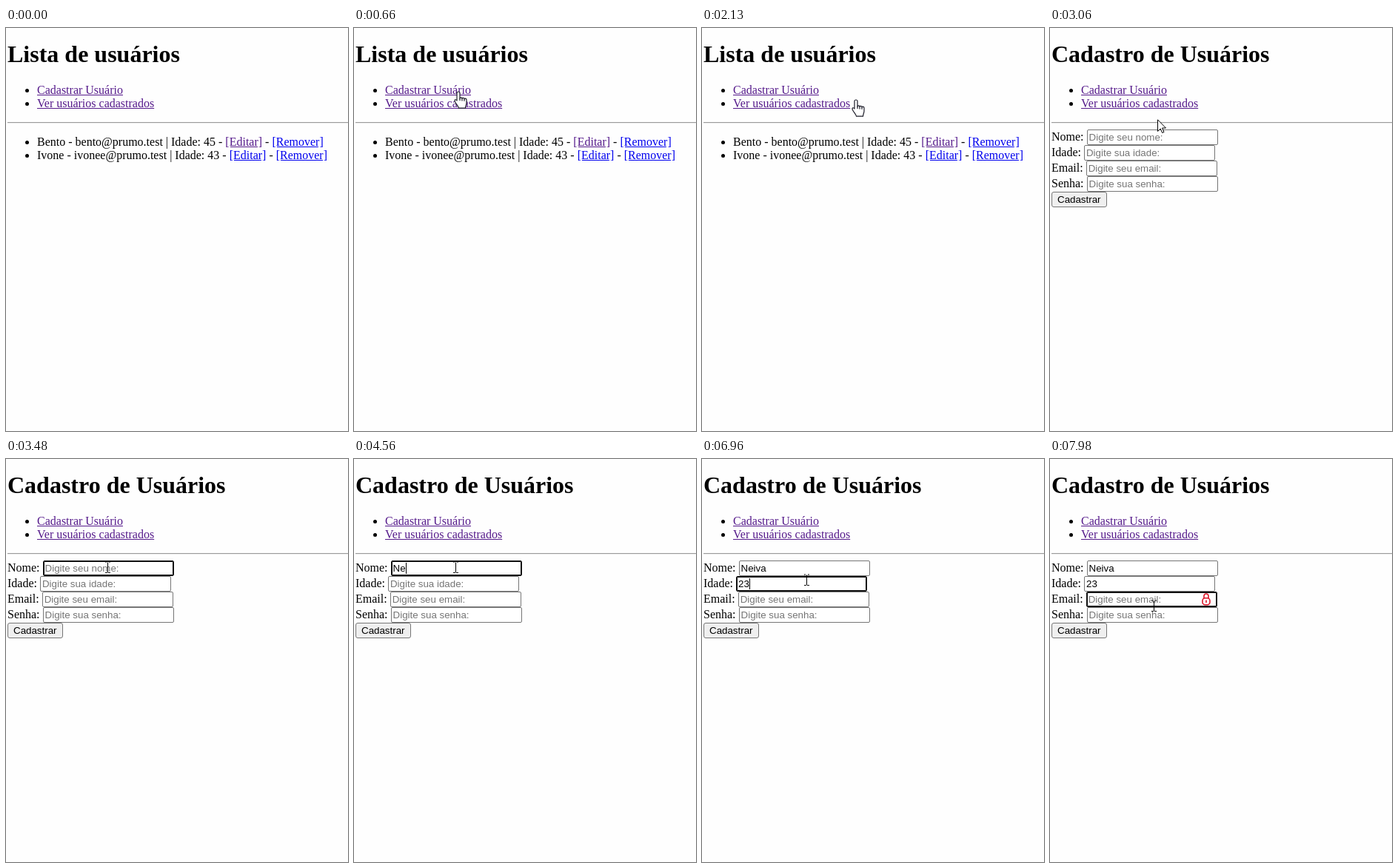
Recreate the animation shown at these times as an HTML page. Size 462 by 544 pixels, loop 8 s.

```html
<!DOCTYPE html>
<html lang="pt-BR">
<meta charset="utf-8">
<title>Cadastro</title>
<style>
  html, body { margin: 0; width: 100%; height: 100%; overflow: hidden; background: #fefefe; }
  body { position: relative; font: 16px/18px "Liberation Serif", "Times New Roman", serif; color: #000; white-space: nowrap; }
  h1 { position: absolute; left: 2px; top: 17px; margin: 0; font-size: 32px; line-height: 36px; }
  ul { position: absolute; left: 2px; top: 75px; margin: 0; padding-left: 40px; }
  #users { top: 145px; }
  a { color: #00e; text-decoration: underline; }
  a.visited { color: #551a8b; }
  a.active { color: #f00; }
  hr { position: absolute; left: 2px; right: 0; top: 127px; margin: 0; border: 0; height: 1px; background: #9a9a9a; border-bottom: 1px solid #eee; }
  #form { position: absolute; left: 2px; top: 137px; }
  .row { height: 21px; }
  .field, .button { display: inline-block; box-sizing: border-box; height: 21px; border: 1px solid #767676; font: 13.333px/15px "Liberation Sans", Arial, sans-serif; }
  .field { position: relative; width: 177px; padding: 2px; border-radius: 2px; background: #fff; }
  .field.focus { border-color: #101010; box-shadow: inset 0 0 0 1px #101010; }
  .field.empty .text { color: #757575; }
  .caret { display: inline-block; width: 1px; height: 15px; margin-right: -1px; vertical-align: top; background: #000; }
  .button { padding: 2px 7px; border-radius: 3px; background: #efefef; }
  #lock { position: absolute; left: 155px; top: 1px; }
  #pointer { position: absolute; left: 0; top: 0; }
</style>
<h1 id="title"></h1>
<ul>
  <li><a id="register">Cadastrar Usuário</a></li>
  <li><a class="visited">Ver usuários cadastrados</a></li>
</ul>
<hr>
<ul id="users">
  <li>Bento - bento@prumo.test | Idade: 45 - <a class="visited">[Editar]</a> - <a>[Remover]</a></li>
  <li>Ivone - ivonee@prumo.test | Idade: 43 - <a>[Editar]</a> - <a>[Remover]</a></li>
</ul>
<div id="form"></div>
<svg id="pointer" width="462" height="544" fill="#fff" stroke="#000">
  <path id="arrow" d="M.5 .8V16.5L4.2 13 6.7 18.5 9 17.5 6.6 12H11.5Z"/>
  <g id="hand" stroke="#1c1c28" stroke-width="1.2" stroke-linejoin="round">
    <path d="M0 1C1.2 1 2 1.8 2 3V10C2 8.5 5 8.5 5 10.3 5 9 8 9 8 10.9 8 9.7 11 9.8 11 12V16C11 19 9.5 20 9.5 23.2H.5C.5 21-2.5 18.5-4.6 14.5-6 11.8-3.4 10.8-2 13V3C-2 1.8-1.2 1 0 1Z"/>
    <path d="M2 9.5V13M5 10.3V13.4M8 10.9V13.8" fill="none"/>
  </g>
  <path id="beam" d="M-3-7H-1M2-7H4M.5-6.5V7M-3 7.5H0M1 7.5H4" fill="none"/>
</svg>
<script>
  const LOOP = 8000, STEP = 30;
  const $ = id => document.getElementById(id);

  const fields = { Nome: 'Digite seu nome:', Idade: 'Digite sua idade:', Email: 'Digite seu email:', Senha: 'Digite sua senha:' };

  const events = [
    { at: 0, page: 'list', pointer: '', link: 'visited' },
    { at: 90, pointer: 'arrow' },
    { at: 570, pointer: 'hand' },
    { at: 990, link: 'active' },
    { at: 1110, link: 'visited' },
    { at: 2280, page: 'form', pointer: 'arrow' },
    { at: 3150, pointer: 'beam' },
    { at: 3480, focus: 'Nome' },
    { at: 4560, Nome: 'Ne', caret: true },
    { at: 5010, Nome: 'Nei' },
    { at: 5130, Nome: 'Neiva' },
    { at: 6060, focus: 'Idade' },
    { at: 6420, Idade: '2' },
    { at: 6840, Idade: '23' },
    { at: 7380, focus: 'Email' },
    { at: 7980, caret: false }
  ];

  // Each move eases on from the previous end; bend bows it up or down.
  const start = [416, 45];
  const moves = [
    { from: 60, to: 720, end: [134, 85], bend: 10 },
    { from: 1380, to: 1530, end: [229, 103] },
    { from: 1530, to: 2130, end: [208, 96], bend: -8 },
    { from: 2250, to: 2670, end: [237, 94] },
    { from: 2880, to: 3060, end: [145, 123] },
    { from: 3060, to: 3300, end: [137, 146] },
    { from: 5460, to: 5880, end: [141, 163] },
    { from: 7170, to: 7470, end: [140, 198] }
  ];

  const lock = `<svg id="lock" width="12" height="17" fill="none" stroke="#dc1428" stroke-width="1.6">
    <path d="M3 7V4a3 3 0 0 1 6 0V7"/><rect x="1" y="6.8" width="10" height="9" rx="3.5"/>
    <path d="M6 9.5V13"/></svg>`;
  $('form').innerHTML = Object.keys(fields).map(name =>
    `<div class="row">${name}: <span class="field" id="${name}"></span></div>`).join('') +
    '<div class="row"><span class="button">Cadastrar</span></div>';

  const stateAt = t => Object.assign({}, ...events.filter(e => e.at <= t));

  function pointerAt(t) {
    let [x, y] = start;
    for (const { from, to, end, bend = 0 } of moves) {
      const k = Math.min(1, Math.max(0, (t - from) / (to - from)));
      const eased = k * k * (3 - 2 * k);
      x += (end[0] - x) * eased;
      y += (end[1] - y) * eased + bend * Math.sin(Math.PI * eased);
    }
    return [Math.round(x), Math.round(y)];
  }

  function drawField(name, state) {
    const value = state[name], focused = state.focus === name;
    const caret = focused && state.caret ? '<i class="caret"></i>' : '';
    const text = `<span class="text">${value || fields[name]}</span>`;
    $(name).className = `field ${focused ? 'focus' : ''} ${value ? '' : 'empty'}`;
    $(name).innerHTML = (value ? text + caret : caret + text) +
      (focused && name === 'Email' ? lock : '');
  }

  function draw(t) {
    const state = stateAt(t), onForm = state.page === 'form';
    $('title').textContent = onForm ? 'Cadastro de Usuários' : 'Lista de usuários';
    $('users').style.display = onForm ? 'none' : '';
    $('form').style.display = onForm ? '' : 'none';
    $('register').className = state.link;
    for (const name in fields) drawField(name, state);

    const [x, y] = pointerAt(t);
    for (const id of ['arrow', 'hand', 'beam']) {
      $(id).style.display = id === state.pointer ? '' : 'none';
      $(id).setAttribute('transform', `translate(${x} ${y})`);
    }
  }

  let last = -1;
  function tick() {
    const t = Math.floor(performance.now() % LOOP / STEP) * STEP;
    if (t !== last) draw(last = t);
    requestAnimationFrame(tick);
  }
  tick();
</script>
</html>
```
